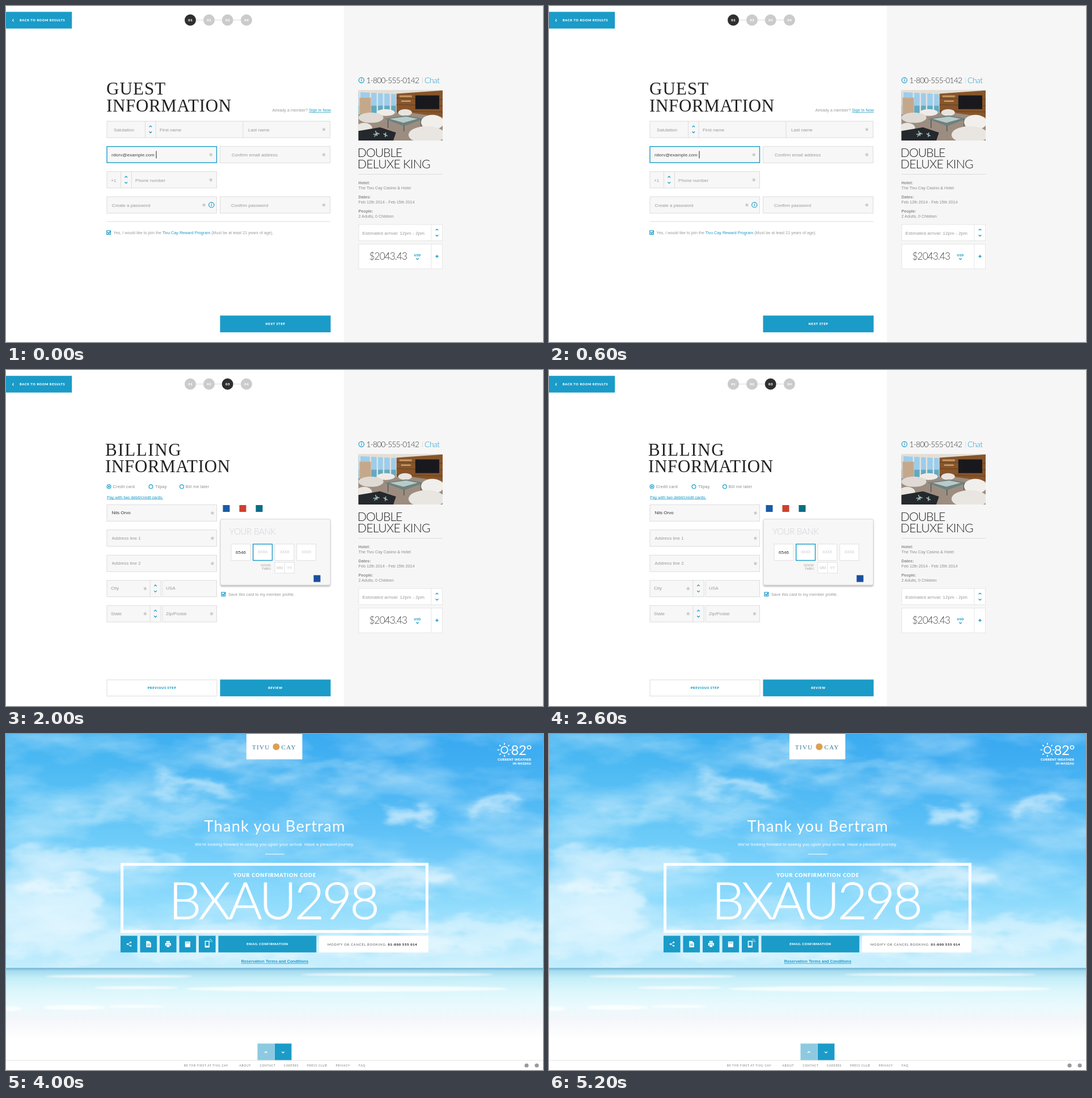
Write an HTML page that moves like this. It is 947 by 592 pixels and loops after 6000 ms.

```html
<!DOCTYPE html>
<html lang="en">
<head>
<meta charset="utf-8">
<title>Hotel booking flow</title>
<style>
html, body { margin: 0; width: 100%; height: 100%; overflow: hidden; background: #fff; }
svg { display: block; width: 947px; height: 592px; }
text { white-space: pre; }
.sans { font-family: "Liberation Sans", Arial, sans-serif; }
.semi { font-family: "Liberation Sans", Arial, sans-serif; font-weight: 700; }
.thin { font-family: Lato, "Open Sans", sans-serif; font-weight: 300; }
.code { font-family: Lato, "Open Sans", sans-serif; font-weight: 300; stroke: #fff; stroke-width: .9px; }
.geo { font-family: Lato, "Open Sans", sans-serif; font-weight: 400; }
.bold { font-family: Lato, "Open Sans", sans-serif; font-weight: 900; }
.serif { font-family: "Liberation Serif", Times, serif; }
.link { fill: #1b9bc8; }
.under { fill: #1b9bc8; text-decoration: underline; }
</style>
</head>
<body>
<svg id="stage" viewBox="0 0 947 592" xmlns="http://www.w3.org/2000/svg"></svg>
<script>
const BLUE = '#1b9bc8', DARK = '#2f2f31', GREY = '#999', EDGE = '#dcdcdc', FIELD = '#f7f7f7';

// Basic shapes
const text = (cls, x, y, size, str, fill = GREY, ls = 0, anchor = 'start') =>
  `<text class="${cls}" x="${x}" y="${y}" font-size="${size}" fill="${fill}" letter-spacing="${ls}" text-anchor="${anchor}">${str}</text>`;
const rect = (x, y, x2, y2, fill, stroke = 'none', sw = 1) =>
  `<rect x="${x}" y="${y}" width="${x2 - x}" height="${y2 - y}" fill="${fill}" stroke="${stroke}" stroke-width="${sw}"/>`;
const path = (d, stroke, sw = 1, fill = 'none') =>
  `<path d="${d}" stroke="${stroke}" stroke-width="${sw}" fill="${fill}"/>`;
const disc = (x, y, r, fill, stroke = 'none', sw = 1) =>
  `<circle cx="${x}" cy="${y}" r="${r}" fill="${fill}" stroke="${stroke}" stroke-width="${sw}"/>`;
const oval = (x, y, rx, ry, fill, o = 1) =>
  `<ellipse cx="${x}" cy="${y}" rx="${rx}" ry="${ry}" fill="${fill}" opacity="${o}"/>`;
const move = (x, y, body) => `<g transform="translate(${x} ${y})">${body}</g>`;
const hline = (x, x2, y, c = EDGE) => path(`M${x} ${y}H${x2}`, c);
const vline = (x, y, y2, c = EDGE) => path(`M${x} ${y}V${y2}`, c);

// Interface parts
const label = (x, y, str, fill = '#fff', anchor = 'start', size = 5.6, ls = .62) =>
  text('bold', x, y, size, str, fill, ls, anchor);
const note = (x, y, str, fill = GREY, ls = 0, anchor) => text('sans', x, y, 7.2, str, fill, ls, anchor);
const hint = (x, y, str, fill = GREY) => text('sans', x, y, 8.1, str, fill);
const field = (x, y, x2, y2 = y + 29) => rect(x, y, x2, y2, FIELD, EDGE);
const title = (x, y, str, ls) => text('serif', x, y, 31, str, '#222', ls);
const chevron = (x, y, up, c = BLUE) => {
  const s = up ? -1 : 1;
  return path(`M${x - 2.3} ${y - s}L${x} ${y + 1.2 * s}L${x + 2.3} ${y - s}`, c, 1.3);
};
const spinner = (x, y) => chevron(x, y - 5, true) + chevron(x, y + 5, false);
const star = (x, y) => {
  let d = '';
  for (let i = 0; i < 5; i++) {
    const a = i * Math.PI * .4 - Math.PI / 2;
    d += `M${x} ${y}l${(3 * Math.cos(a)).toFixed(2)} ${(3 * Math.sin(a)).toFixed(2)}`;
  }
  return path(d, '#c4c4c4', 1.4);
};
const check = (x, y, on) => rect(x - 3.3, y - 3.3, x + 3.3, y + 3.3, '#fff', BLUE, 1.2) +
  (on ? path(`M${x - 2} ${y - .6}l2 2.2l4 -4.6`, BLUE, 1.5) : '');
const radio = (x, y, on) => disc(x, y, 3.4, '#fff', BLUE, 1.2) + (on ? disc(x, y, 1.7, BLUE) : '');
const info = (x, y) => disc(x, y, 4.6, 'none', BLUE, 1.2) +
  `<text class="serif" x="${x}" y="${y + 2.4}" font-size="7.5" font-style="italic" font-weight="700" fill="${BLUE}" text-anchor="middle">i</text>`;
const nextBtn = (y, str) => rect(377.5, y, 572.5, y + 29.5, BLUE) + label(475, y + 17, str, '#fff', 'middle');
const prevBtn = y => rect(178, y + .5, 372, y + 29, '#fff', EDGE) +
  label(275, y + 17, 'PREVIOUS STEP', BLUE, 'middle');

function header(step) {
  let s = rect(0, 10.3, 116.2, 39.7, BLUE) + path('M13.5 23l-2 2.2l2 2.2', '#fff', 1.1) +
    label(24, 27.1, 'BACK TO ROOM RESULTS') + hline(325, 424, 24.8, '#d8d8d8');
  [325, 358, 390.7, 424].forEach((x, i) => {
    s += disc(x, 24.8, 10, i === step ? DARK : '#cbcbcb') +
      label(x + .2, 27, '0' + (i + 1), '#fff', 'middle', 6.2, .4);
  });
  return s;
}

// Soft sketch of a living room by the sea
function room() {
  const poly = (pts, fill) => `<polygon points="${pts}" fill="${fill}"/>`;
  return `<svg x="621.5" y="148.5" width="148.5" height="88.5" viewBox="0 0 148 88" preserveAspectRatio="none">` +
    rect(0, 0, 148, 88, '#a39283') + '<g filter="url(#haze)">' +
    rect(0, 3, 70, 42, '#9ccdea') + rect(0, 27, 70, 42, '#62a9c2') +
    poly('-4,-4 152,-4 152,3 70,7 -4,3', '#e4ded4') +
    [1, 20, 32, 43, 55, 66].map(x => rect(x, 2, x + 2.5, 44, '#e2e2e0')).join('') +
    poly('67,6 152,0 152,52 67,42', '#87552b') +
    [14, 25, 36].map(y => path(`M67 ${y}L148 ${y + 2}`, '#64401f', 1)).join('') +
    rect(72, 9, 94, 12, '#c99a62') + rect(75, 18, 92, 20, '#d9b078') +
    rect(100, 9, 142, 33, '#19191d') + rect(2, 13, 22, 41, '#c5a88a') +
    poly('-4,42 90,39 152,48 152,92 -4,92', '#9c8d80') +
    oval(48, 39, 16, 6, '#efece7') + oval(82, 39, 12, 6, '#e8e4de') + oval(22, 48, 22, 9, '#dfdad4') +
    poly('46,50 84,44 115,50 80,63', '#6f817f') + poly('55,50 84,46 104,50 79,57', '#b9cbc9') +
    path('M52 52V66M80 62V72M110 51V63', '#455', 1.3) +
    oval(130, 56, 20, 13, '#f1efeb') + oval(120, 78, 32, 15, '#e9e6e2') + oval(10, 66, 14, 9, '#e9e6e1') +
    poly('-4,72 38,65 66,74 60,92 -4,92', '#25282c') +
    path('M30 71l3 9M26 77l11 -1M28 81l6 -7M44 76l7 4M48 74l-1 8', '#9dc0bd', 1.6) + '</g></svg>';
}

const price = () => rect(622, 419.5, 769.5, 463, '#fff', '#e6e6e6') + vline(750, 420, 463, '#e6e6e6') +
  text('thin', 640.5, 447, 17.2, '$2043.43', '#444', -.9) +
  label(725.6, 441.2, 'USD', BLUE, 'middle', 5.4, .3) + chevron(725.6, 445.5, false) +
  path('M757.4 441.2h5.2M760 438.6v5.2', BLUE, 1.5);

function booking() {
  const rows = [['Hotel:', 'The Tivu Cay Casino &amp; Hotel'],
    ['Dates:', 'Feb 12th 2014 - Feb 15th 2014'], ['People:', '2 Adults, 0 Children']];
  return info(626.8, 130.8) + text('thin', 635.5, 135.8, 13.7, '1-800-555-0142', '#333', -.7) +
    vline(734.5, 126, 136, '#ddd') + text('thin', 738, 135.8, 13.9, 'Chat', BLUE, -.5) + room() +
    text('thin', 619.8, 266.3, 21.3, 'DOUBLE', '#222', -1.1) +
    text('thin', 619.8, 286, 21.3, 'DELUXE KING', '#222', -.75) + hline(622, 770, 296.5) +
    rows.map(([k, v], i) => text('semi', 621.5, 314.3 + i * 24.8, 7.2, k, '#8c8c8c') +
      note(621.5, 322.9 + i * 24.8, v, '#8c8c8c')).join('') +
    rect(622, 385, 769.5, 413.5, '#fff', '#e6e6e6') + vline(750, 385, 413, '#e6e6e6') +
    text('sans', 628.5, 402.7, 8, 'Estimated arrival: 12pm - 2pm', GREY, .1) + spinner(760, 399.3);
}

function addOns() {
  const items = [['11am Early check-in', '+$50', 1], ['4pm Late check-out', '+$50', 0],
    ['Suite upgrade list', '+$20', 1], ['Rainy day insurance', '+$100', 0]];
  return text('thin', 620.5, 368.6, 13.2, 'SUGGESTED ADD-ONS', '#333', -.1) +
    rect(622, 377.5, 769.5, 493.5, '#fff', '#e9e9e9') +
    items.map(([name, cost, on], i) => {
      const y = 392.5 + i * 29;
      return check(632.7, y, on) + text('semi', 646, 393 + i * 28, 7.2, name, '#8c8c8c') +
        note(i ? 646 : 648, 401 + i * 28, cost, '#8c8c8c') + (i ? hline(622, 769, y - 15, '#e9e9e9') : '');
    }).join('');
}

const panel = rect(596, 0, 947, 592, '#f6f6f6');
const side = panel + booking() + price();
const longSide = panel + move(0, -64, booking()) + addOns() + move(0, 79.8, price());

const guest = () => header(0) + side +
  title(177, 156, 'GUEST', 1.1) + title(177, 185.5, 'INFORMATION', .65) +
  note(573, 186, 'Already a member? <tspan class="under">Sign In Now</tspan>', GREY, 0, 'end') +
  field(178, 203, 571.5, 232) + [245.5, 264, 418].map(x => vline(x, 203, 232)).join('') +
  hint(190, 220.6, 'Salutation') + spinner(254.8, 217.3) + hint(271, 220.6, 'First name') +
  hint(427, 220.6, 'Last name') + star(560.5, 217.5) +
  rect(178, 247.6, 371.5, 276, FIELD, BLUE, 1.4) + hint(186, 265, 'nilorv@example.com', '#444') +
  vline(265, 255.5, 268.5, '#222') + star(361.3, 262) +
  field(377.5, 247.3, 571.5) + hint(398, 265, 'Confirm email address') + star(560.5, 262) +
  field(178, 291.7, 371.5) + vline(202.5, 292, 320) + vline(221.5, 292, 320) + hint(185, 309.5, '+1') +
  spinner(211.8, 306.2) + hint(228, 309.5, 'Phone number') + star(361.3, 306.3) +
  field(178, 336, 371.5) + hint(186.5, 353.8, 'Create a password') + star(349, 350.7) + info(362.3, 350.4) +
  field(377.5, 336, 571.5) + hint(397, 353.8, 'Confirm password') + star(560.5, 350.7) +
  hline(178, 572, 379.7) + check(181, 399.2, 1) +
  note(189.5, 402, 'Yes, I would like to join the <tspan class="link">Tivu Cay Reward Program</tspan> (Must be at least 21 years of age).') +
  nextBtn(545.4, 'NEXT STEP');

const plane = `<path transform="translate(196.7 309) rotate(45)" d="M0-26C3-26 4-20 4-16V-8L22 5V10L4 4V15L10 20V23L0 20L-10 23V20L-4 15V4L-22 10V5L-4-8V-16C-4-20-3-26 0-26Z" fill="#000"/>`;
const calendar = (x, y) => rect(x - 4, y - 3.6, x + 4, y + 4.2, '#fff') +
  path(`M${x - 3} ${y - 1.4}h6M${x - 2.6} ${y + 1}h5.2M${x - 2.6} ${y + 2.7}h5.2`, BLUE, .6) +
  path(`M${x - 2} ${y - 4.6}v2M${x + 2} ${y - 4.6}v2`, '#fff', 1);

const flights = () => header(1) + side +
  title(177, 205.5, 'ADD YOUR', .4) + title(177, 235, 'FLIGHTS', 1.8) +
  field(178, 252, 328) + field(360, 252, 480.5) + field(483.5, 252, 571.5) +
  rect(330.3, 251.7, 360, 281.3, BLUE) + calendar(345.3, 266.7) +
  hint(188.7, 269.6, 'New York (JFK) - Nassau (NAS)') + hint(364.5, 269.6, 'Wed Feb 12 - Fri Feb 14') +
  hint(492.5, 269.6, '2 passengers') + plane +
  text('sans', 234, 312.6, 9.6, 'Flights from JFK to Nassau', '#333', .3) +
  text('sans', 358, 322.3, 8.1, 'started from', '#aaa', 0, 'end') +
  text('thin', 376.5, 321, 20.5, '$700', '#333') +
  rect(444.3, 299.7, 572.5, 329, BLUE) + label(508.5, 316.9, 'SEE ALL FLIGHTS', '#fff', 'middle') +
  prevBtn(545.4) + nextBtn(545.4, 'SKIP STEP');

function billing() {
  const mark = (x, y, c) => rect(x - 6, y - 6, x + 6, y + 6, c);
  const slots = [397, 435.7, 474, 512.7].map((x, i) =>
    rect(x, 306.7, x + 33.8, 335.5, '#fff', i === 1 ? BLUE : '#e2e2e2', i === 1 ? 1.4 : 1) +
    (i ? text('sans', x + 17, 323.4, 6.3, 'XXXX', '#c4c4c4', 0, 'middle')
       : text('sans', x + 17, 324, 8.1, '6546', '#333', 0, 'middle'))).join('');
  return header(2) + side + title(175, 150.5, 'BILLING', 1.6) + title(175, 180, 'INFORMATION', .65) +
    radio(181.5, 205.6, 1) + radio(255.5, 205.6) + radio(310, 205.6) +
    note(188.5, 208.2, 'Credit card', '#888', .3) + note(263, 208.2, 'Tilpay', '#888', .3) +
    note(316.8, 208.2, 'Bill me later', '#888', .3) +
    note(178, 226.5, '<tspan class="under">Pay with two debit/credit cards.</tspan>') +
    [237.3, 281.7, 326.2].map((y, i) => field(178, y, 371.5) + star(364, y + 14.7) +
      hint(186.5, y + 17.1, ['Nils Orvo', 'Address line 1', 'Address line 2'][i], i ? GREY : '#333')).join('') +
    [[370.6, 'City', 'USA'], [415, 'State', 'Zip/Postal']].map(([y, a, b], i) =>
      field(178, y, 273.3) + vline(254, y, y + 29) + field(276, y, 371.5) + hint(185, y + 16.5, a) +
      hint(282, y + 16.5, b) + star(245.3, y + 14.5) + spinner(263.5, y + 14.3) +
      (i ? star(362.5, y + 14.5) : '')).join('') +
    mark(388.5, 244, '#1a5ba5') + mark(417.5, 244, '#cf3f2c') + mark(446.5, 244, '#0b6c84') +
    `<rect x="378" y="264.5" width="194" height="117" rx="3" fill="#000" opacity=".28" filter="url(#soft)"/>` +
    `<rect x="378" y="262.7" width="194" height="116.3" rx="3" fill="#f7f7f7" stroke="#d6d6d6"/>` +
    text('thin', 394, 290, 15, 'YOUR BANK', '#d0d0d0', -.3) + slots +
    text('sans', 467, 345.6, 5.8, 'GOOD', GREY, 0, 'end') + text('sans', 467, 352, 5.8, 'THRU', GREY, 0, 'end') +
    rect(474, 338.7, 508.5, 358, '#fff', '#e2e2e2') + vline(491.2, 339, 358, '#e2e2e2') +
    text('sans', 482.8, 350.8, 6.6, 'MM', '#c4c4c4', 0, 'middle') +
    text('sans', 500, 350.8, 6.6, 'YY', '#c4c4c4', 0, 'middle') + mark(548.5, 367.5, '#1a4f9c') +
    check(383.3, 395, 1) + note(392, 398, 'Save this card to my member profile.') +
    prevBtn(545.4) + nextBtn(545.4, 'REVIEW');
}

function review() {
  const cell = (x, y, name, val, ls = -.4, dark = false) =>
    label(x, y, name, dark ? '#fff' : '#a0a0a0', 'start', 4.8, .55) +
    text('thin', x - .7, y + 23.3, 12.7, val, dark ? '#fff' : '#333', ls);
  const line = '#ebebeb', seam = '#505053';
  return header(3) + longSide + title(176, 106, 'REVIEW', 1.1) + title(176, 135.6, 'AND PAY', 0) +
    rect(466.7, 108.8, 572, 137.7, '#fff', EDGE) + label(484, 125.7, 'EDIT RESERVATION', BLUE) +
    path('M556.5 125.5l.7 -2.4l3 -2.7l1.6 1.6l-3 2.8z', 'none', 0, BLUE) +
    rect(178, 162.7, 572, 368, '#fff', line) + hline(178, 375, 204.2, line) + hline(178, 375, 265.3, line) +
    hline(178, 375, 326.6, line) + vline(276, 204, 326.5, line) +
    rect(375, 204, 572.3, 368.3, DARK) + hline(375, 572, 265.3, seam) + hline(375, 572, 326.6, seam) +
    vline(473.7, 204, 265, seam) +
    label(191.5, 177.5, 'GUEST', '#a0a0a0', 'start', 4.8) + text('thin', 190.5, 191.2, 12.5, 'NILS ORVO', '#333', -.5) +
    cell(191.7, 217.5, 'WEDNESDAY', 'FEB 12') + cell(289, 217.5, 'SATURDAY', 'FEB 15') +
    cell(390, 217.5, 'CHARGES', '$600.00', .2, true) + cell(486, 217.5, 'TAXES &amp; FEES', '$400.50', .2, true) +
    cell(191.7, 279.2, 'DURATION', '3 NIGHTS', 0) + cell(289, 279.2, 'GUESTS', '2 ADULTS', -.5) +
    label(389, 279.2, 'TOTAL COST', '#fff', 'start', 4.8) + text('thin', 389, 313.8, 32.2, '$1,000.50', '#fff') +
    label(191.7, 341.3, 'BILLING ADDRESS', '#a0a0a0', 'start', 4.8) +
    text('thin', 191.5, 355.7, 12.7, '00102 USA', '#333') +
    label(389, 341.3, 'PAYMENT METHOD', '#fff', 'start', 4.8) + text('thin', 386.5, 355.7, 12.2, 'IVLA', '#fff') +
    text('geo', 415, 355.7, 7.6, 'XXXX XXXX XXXX XXXX 1234', '#fff', -.55) +
    field(178, 377.8, 572, 406.7) + vline(186.5, 386, 398.5, '#555') +
    note(189, 395, 'Enter special requests', GREY, .55) + check(185, 426.6, 1) +
    note(193, 428.8, 'Yes, enroll me in <tspan class="under">Tivu Cay Reward Program</tspan> to receive <tspan font-weight="700">$50</tspan> gaming credit.', GREY, .62) +
    check(185, 446.6, 0) +
    note(193, 448.8, 'I agree with the Reservation <tspan class="under">Terms and Conditions</tspan>.', GREY, .55) +
    prevBtn(506) + nextBtn(506, 'CONFIRM');
}

function beach() {
  const clouds = [[40, 300, 130, 55, .5], [140, 225, 150, 22, .45], [345, 95, 75, 18, .5], [430, 22, 70, 10, .4],
    [715, 145, 45, 18, .6], [862, 125, 45, 14, .55], [690, 255, 110, 22, .45], [75, 270, 45, 8, .7],
    [300, 370, 330, 26, .4], [820, 350, 170, 26, .45], [250, 140, 160, 14, .3], [560, 70, 120, 12, .25]];
  const foam = [[200, 427, 130, 2.5], [690, 424, 170, 2.5], [230, 447, 75, 2.5], [600, 449, 285, 5],
    [120, 482, 55, 4], [10, 484, 18, 4], [230, 480, 50, 2.5]];
  return rect(0, 0, 947, 592, '#fff') + rect(0, 0, 947, 413, 'url(#sky)') + rect(0, 0, 947, 413, 'url(#deep)') +
    `<g clip-path="url(#air)"><rect width="947" height="413" filter="url(#wisps)" opacity=".4"/>` +
    `<g filter="url(#cloud)">${clouds.map(([x, y, a, b, o]) => oval(x, y, a, b, '#fff', o)).join('')}</g></g>` +
    rect(0, 412, 947, 550, 'url(#sea)') +
    `<g filter="url(#soft)">${foam.map(([x, y, a, b]) => oval(x, y, a, b, '#fff', .8)).join('')}</g>`;
}

function icons() {
  const xs = [202, 236.5, 271, 305.6, 340];
  const y = 370.2, c = xs.map(x => x + 14.8);
  return xs.map(x => rect(x, 355.5, x + 29.6, 384.8, BLUE)).join('') +
    path(`M${c[0] + 3} ${y - 3}L${c[0] - 2.6} ${y}L${c[0] + 3} ${y + 3}`, '#fff', .9) +
    [[3, -3], [-2.6, 0], [3, 3]].map(([a, b]) => disc(c[0] + a, y + b, 1.4, '#fff')).join('') +
    path(`M${c[1] - 4} ${y - 5.5}h5l3.5 3.5v7.5h-8.5z`, 'none', 0, '#fff') +
    path(`M${c[1] - 2.5} ${y}h5.5M${c[1] - 2.5} ${y + 2.2}h5.5`, BLUE, .9) +
    rect(c[2] - 3, y - 5.5, c[2] + 3, y - 2.6, '#fff') + rect(c[2] - 5, y - 2, c[2] + 5, y + 3, '#fff') +
    rect(c[2] - 2.8, y + .8, c[2] + 2.8, y + 5.6, '#fff', BLUE, .7) +
    rect(c[3] - 4.6, y - 4.6, c[3] + 4.6, y + 5.4, '#fff') + path(`M${c[3] - 3.5} ${y - 2.2}h7`, BLUE, .8) +
    rect(c[4] - 3.3, y - 5, c[4] + 3.3, y + 5.3, 'none', '#fff', 1.5) + rect(c[4] - 3, y + 3, c[4] + 3, y + 5, '#fff') +
    path(`M${c[4] + 4} ${y - 6.5}a3 3 0 0 1 2 3M${c[4] + 4} ${y - 9}a5.5 5.5 0 0 1 4.5 5.5`, '#fff', .8);
}

function thanks() {
  let rays = '';
  for (let i = 0; i < 8; i++) {
    const c = Math.cos(i * Math.PI / 4), s = Math.sin(i * Math.PI / 4);
    rays += `M${879 + 9 * c} ${28 + 9 * s}L${879 + 12.3 * c} ${28 + 12.3 * s}`;
  }
  const menu = [[314, 'BE THE FIRST AT TIVU CAY'], [411.5, 'ABOUT'], [447.5, 'CONTACT'], [490, 'CAREERS'],
    [531, 'PRESS CLUB'], [581.5, 'PRIVACY'], [622, 'FAQ']];
  return beach() + rect(424, 0, 522.5, 44.6, '#fff') +
    text('serif', 434, 27, 11.2, 'TIVU', '#34799a', 1.2) + disc(476.5, 22.5, 6, '#dda052') +
    text('serif', 485.5, 27, 11.2, 'CAY', '#34799a', 1.2) +
    disc(879, 28, 5.8, 'none', '#fff', 1.7) + path(rays, '#fff', 1.7) +
    text('geo', 890.5, 36.7, 24, '82°', '#fff', -.4) +
    label(926.3, 47, 'CURRENT WEATHER', '#fff', 'end', 5.7, .25) + label(926.3, 54.3, 'IN NASSAU', '#fff', 'end', 5.7, .25) +
    text('geo', 474, 172, 27.3, 'Thank you Bertram', '#fff', 1.2, 'middle') +
    text('sans', 473.5, 197, 8, "We're looking forward to seeing you upon your arrival. Have a pleasent journey.", '#fff', 0, 'middle') +
    hline(457, 491, 211.7, '#fff') + rect(204.6, 229.6, 742.4, 348, 'none', '#fff', 5) +
    label(474, 251.8, 'YOUR CONFIRMATION CODE', '#fff', 'middle', 9.2, .8) +
    text('code', 287, 326, 91, 'BXAU298', '#fff', -4) + icons() +
    rect(374.5, 355.5, 547.3, 384.8, BLUE) + label(461, 372.4, 'EMAIL CONFIRMATION', '#fff', 'middle') +
    rect(552, 355.5, 745, 384.8, '#fff') +
    text('geo', 567, 373.2, 5.8, 'MODIFY OR CANCEL BOOKING: <tspan font-weight="900" fill="#333">01-800 555 014</tspan>', '#555', .72) +
    text('semi', 474, 403, 7.2, '<tspan class="under">Reservation Terms and Conditions</tspan>', BLUE, 0, 'middle') +
    rect(443.5, 545.4, 473, 575, '#8dcae1') + rect(473.6, 545.4, 503.5, 575, BLUE) +
    chevron(458.3, 560.7, true, '#fff') + chevron(488.5, 560.7, false, '#fff') +
    rect(0, 575, 947, 592, '#fff') + hline(0, 947, 575, '#e2e2e2') +
    menu.map(([x, s]) => text('geo', x, 585.7, 4.9, s, '#777', .75)).join('') +
    disc(918, 584, 3.6, '#999') + disc(936, 584, 3.6, '#999');
}

const stops = list => list.map(([o, c, a = 1]) => `<stop offset="${o}" stop-color="${c}" stop-opacity="${a}"/>`).join('');
const fade = (id, list) => `<linearGradient id="${id}" x1="0" y1="0" x2="0" y2="1">${stops(list)}</linearGradient>`;
const blur = (id, dev) => `<filter id="${id}" x="-10%" y="-20%" width="120%" height="140%"><feGaussianBlur stdDeviation="${dev}"/></filter>`;
const defs = '<defs>' +
  fade('sky', [[0, '#40b2f0'], [.35, '#62c6f7'], [.7, '#8cdafc'], [1, '#c4eefd']]) +
  fade('sea', [[0, '#74b6d6'], [.04, '#a6dbee'], [.13, '#c4eef8'], [.3, '#dcf7fc'], [.48, '#e9fafd'], [.65, '#f4f6fa'], [.9, '#fff']]) +
  `<radialGradient id="deep" cx=".85" cy="0" r=".75">${stops([[0, '#2a98f0', .4], [1, '#2a98f0', 0]])}</radialGradient>` +
  '<clipPath id="air"><rect width="947" height="413"/></clipPath>' + blur('soft', 1.6) + blur('haze', .7) +
  '<filter id="cloud" x="-10%" y="-10%" width="120%" height="120%" color-interpolation-filters="sRGB">' +
  '<feGaussianBlur stdDeviation="9" result="puff"/>' +
  '<feTurbulence type="fractalNoise" baseFrequency=".012 .025" numOctaves="4" seed="3"/>' +
  '<feDisplacementMap in="puff" scale="80" xChannelSelector="R" yChannelSelector="G"/></filter>' +
  '<filter id="wisps" x="0" y="0" width="100%" height="100%" color-interpolation-filters="sRGB">' +
  '<feTurbulence type="fractalNoise" baseFrequency=".005 .014" numOctaves="5" seed="7"/>' +
  '<feColorMatrix values="0 0 0 0 1  0 0 0 0 1  0 0 0 0 1  2.6 0 0 0 -1.1"/></filter></defs>';

const scenes = [[0, guest], [1000, flights], [2000, billing], [3000, review], [4000, thanks]];
const LOOP = 6000;
const stage = document.getElementById('stage');
stage.innerHTML = defs + scenes.map(([, draw]) => `<g class="scene" display="none">${draw()}</g>`).join('');
const layers = [...stage.querySelectorAll('.scene')];

let shown = -1;
const begin = performance.now();
function tick() {
  const time = (performance.now() - begin) % LOOP;
  const now = scenes.filter(([at]) => at <= time).length - 1;
  if (now !== shown) {
    layers.forEach((g, i) => g.setAttribute('display', i === now ? 'inline' : 'none'));
    shown = now;
  }
  requestAnimationFrame(tick);
}
tick();
</script>
</body>
</html>
```
